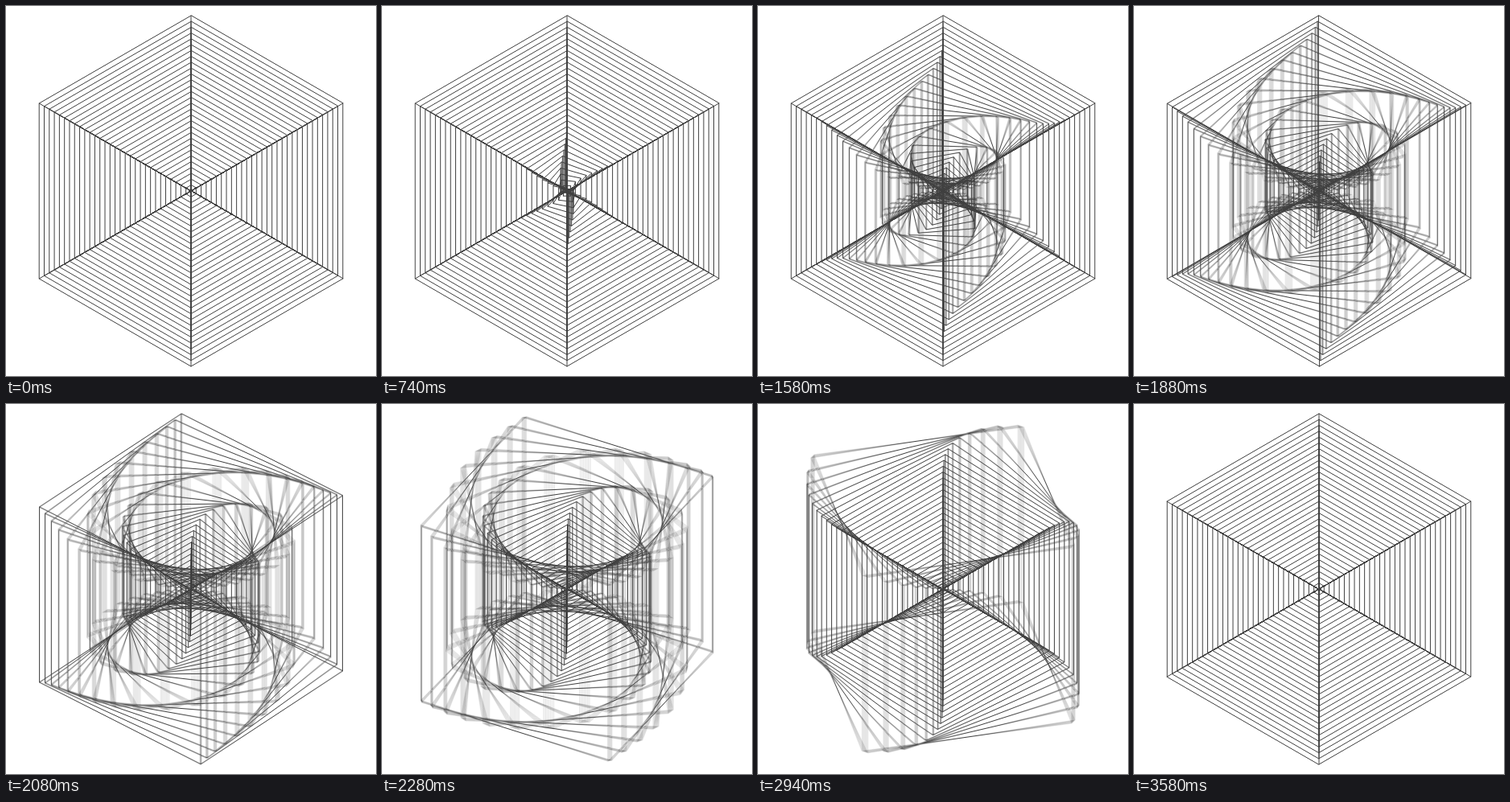
An HTML page with a canvas for the animation above (3.6 s loop, 460 by 460 pixels).

```html
<!DOCTYPE html>
<html lang="en">
<head>
<meta charset="utf-8">
<title>Nested turning cubes</title>
<style>
html, body { margin: 0; width: 100%; height: 100%; overflow: hidden; background: #fff; }
canvas { display: block; width: 460px; height: 460px; }
</style>
</head>
<body>
<canvas id="stage" width="460" height="460"></canvas>
<script>
const SIZE = 460, MID = SIZE / 2;
const LOOP = 3600, STEP = 20;
const CUBES = 30, OUTER = 218;
const TURN = LOOP / 2;                // time one cube takes for its half turn
const STAGGER = TURN / CUBES;
const SAMPLES = 10;

const view = document.getElementById('stage').getContext('2d');
const layer = document.createElement('canvas');
layer.width = layer.height = SIZE;
const ink = layer.getContext('2d');

const clamp = x => Math.min(1, Math.max(0, x));
const ease = p => p < 0.5 ? 4 * p ** 3 : 1 - 4 * (1 - p) ** 3;

// Isometric wireframe cube turned about its vertical axis
function addCube(radius, angle) {
  const half = radius / 2;
  const corners = [0, 1, 2, 3].map(k => {
    const a = k * Math.PI / 2 - angle;
    return [MID + radius * Math.sqrt(0.75) * Math.cos(a), MID + half * Math.sin(a)];
  });
  for (const lift of [-half, half]) {
    corners.forEach(([x, y], k) => k ? ink.lineTo(x, y + lift) : ink.moveTo(x, y + lift));
    ink.closePath();
  }
  for (const [x, y] of corners) {
    ink.moveTo(x, y - half);
    ink.lineTo(x, y + half);
  }
}

function drawCubes(time) {
  ink.fillStyle = '#fff';
  ink.fillRect(0, 0, SIZE, SIZE);
  ink.strokeStyle = '#404040';
  ink.lineWidth = 1;
  ink.lineJoin = ink.lineCap = 'round';
  ink.beginPath();
  for (let i = 1; i <= CUBES; i++) {
    const turn = ease(clamp((time - i * STAGGER) / TURN));
    addCube(OUTER * i / CUBES, Math.PI * turn);
  }
  ink.stroke();
}

// Motion blur: running average over one step of open shutter
function render(time) {
  for (let s = 0; s < SAMPLES; s++) {
    drawCubes(time + STEP * (1 + (s + 0.5) / SAMPLES));
    view.globalAlpha = 1 / (s + 1);
    view.drawImage(layer, 0, 0);
  }
}

const start = performance.now();
let shown = -1;

function tick() {
  const time = Math.floor((performance.now() - start) % LOOP / STEP) * STEP;
  if (time !== shown) render(shown = time);
  requestAnimationFrame(tick);
}
tick();
</script>
</body>
</html>
```
